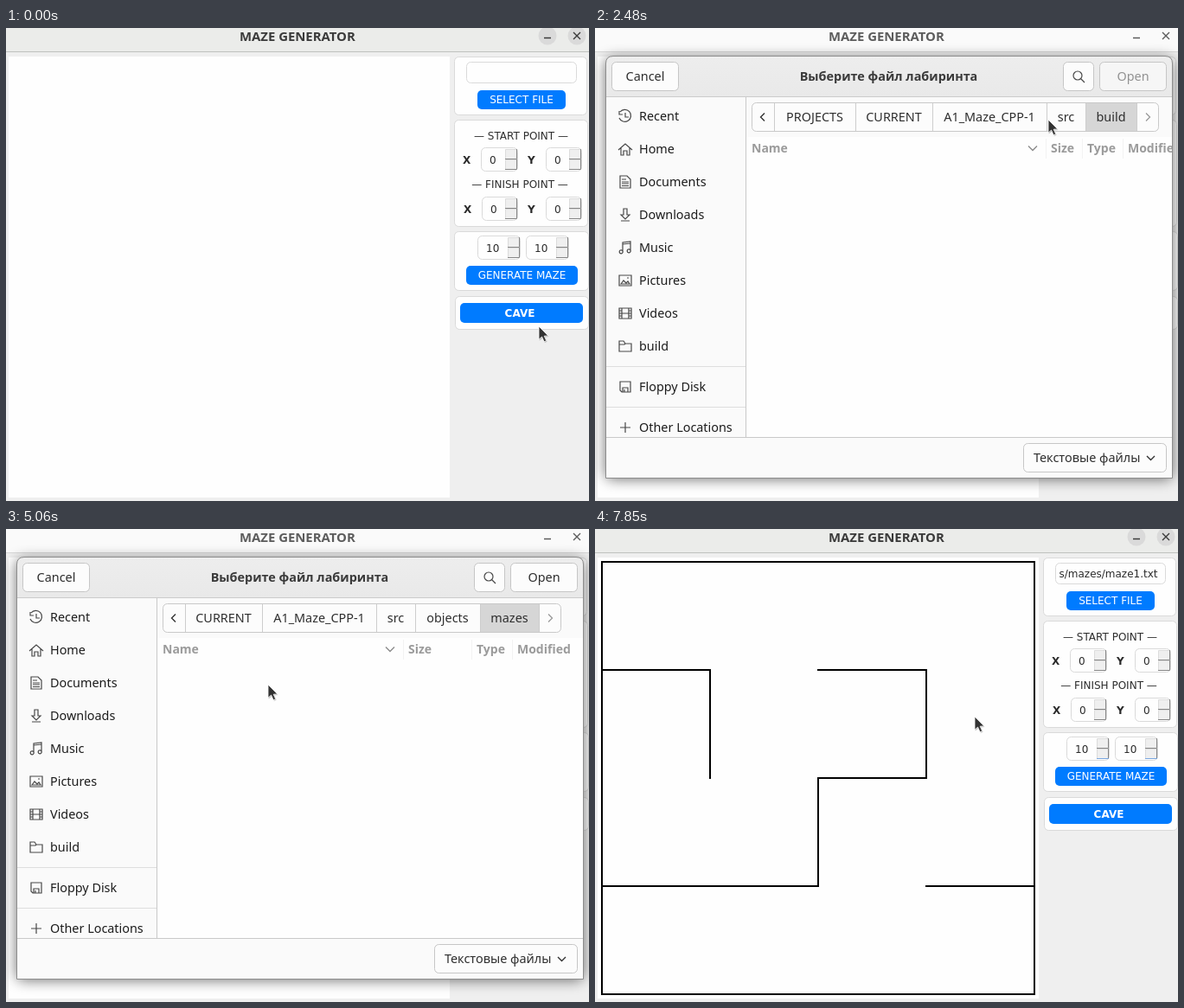
Write an HTML page that moves like this. It is 674 px wide and 547 px high and loops after 7.92 s.

```html
<!DOCTYPE html>
<html lang="en">
<head>
<meta charset="utf-8">
<title>Maze generator</title>
<style>
  html, body { margin: 0; width: 100%; height: 100%; overflow: hidden; background: #efefef; }
  svg { display: block; width: 674px; height: 547px; }
  text { white-space: pre; }
  .app { font: 12px "DejaVu Sans", sans-serif; fill: #2b2b2b; }
  .gtk { font: 14.4px "Noto Sans", "Open Sans", sans-serif; fill: #2e2e2e; }
  .bold { font-weight: bold; }
  .icon { fill: none; stroke: #484848; stroke-width: 1.2; }
</style>
</head>
<body>
<svg viewBox="0 0 674 547">
  <defs>
    <filter id="shadow" x="-10%" y="-10%" width="120%" height="120%">
      <feGaussianBlur stdDeviation="8"/>
    </filter>
    <clipPath id="field"><rect x="537" y="40" width="118" height="24"/></clipPath>
    <clipPath id="list"><rect x="175" y="80" width="492" height="393"/></clipPath>
    <clipPath id="frame"><path d="M13 520V41Q13 33 21 33H659Q667 33 667 41V520Z"/></clipPath>
    <linearGradient id="head" x2="0" y2="1">
      <stop offset="0" stop-color="#ededed"/><stop offset="1" stop-color="#e9e9e9"/>
    </linearGradient>
  </defs>
  <g id="scene"></g>
  <g id="cursor">
    <path d="M.7 1V16.6L4.4 13.4L6.9 19L9.6 17.8L7.1 12.4L11.6 12Z" fill="#000" opacity=".22"/>
    <path d="M0 0V15.2L3.6 12.1L6.1 17.8L8.7 16.6L6.2 11.2L10.8 10.9Z" fill="#333" stroke="#fff" stroke-width=".8"/>
  </g>
</svg>
<script>
const LOOP = 7920;
const scene = document.getElementById('scene');
const cursor = document.getElementById('cursor');

// Cursor moves: start, end, number of steps, way points
const MOVES = [
  [200, 670, 8, [616, 345], [608, 220], [616, 104]],
  [810, 940, 3, [616, 104], [621, 90]],
  [1540, 2280, 12, [621, 90], [641, 56], [518, 106]],
  [2340, 2480, 3, [518, 106], [524, 106]],
  [2540, 2740, 4, [524, 106], [541, 106]],
  [3000, 3070, 2, [541, 106], [470, 119]],
  [3140, 3200, 2, [470, 119], [320, 252]],
  [3800, 4130, 6, [320, 252], [302, 170]],
  [4270, 4270, 1, [302, 170], [304, 168]],
  [4530, 4860, 6, [304, 168], [303, 180]],
  [5390, 5850, 8, [303, 180], [301, 169]],
  [6970, 7110, 3, [301, 169], [303, 172]],
  [7310, 7850, 9, [303, 172], [439, 217]]
];

const rect = (x, y, w, h, fill, extra = '') =>
  `<rect x="${x}" y="${y}" width="${w}" height="${h}" fill="${fill}" ${extra}/>`;
const box = (x, y, w, h, r, fill = '#fefefe', stroke = '#dadada') =>
  rect(x + .5, y + .5, w - 1, h - 1, fill, `rx="${r}" stroke="${stroke}"`);
const text = (cls, x, y, s, extra = '') => `<text class="${cls}" x="${x}" y="${y}" ${extra}>${s}</text>`;
const mid = (cls, x, y, s, fill = '#2e2e2e') =>
  text(cls, x, y, s, `text-anchor="middle" style="fill:${fill}"`);
const line = (d, stroke, width = 1) => `<path d="${d}" fill="none" stroke="${stroke}" stroke-width="${width}"/>`;
const icon = (x, y, d) => `<path class="icon" transform="translate(${x} ${y})" d="${d}"/>`;

function button(x, y, w, label, cls = 'app', fill = '#007bff') {
  return rect(x, y, w, 22, fill, 'rx="5"') + mid(cls, x + w / 2 - (w > 140 ? 2 : 0), y + 15.3, label, '#fff');
}

function spin(x, y, w, value, blue) {
  const bx = x + w - 15;
  const half = top => rect(bx, top, 14, 12, '#efefef') +
    line(`M${bx + .5} ${top + 11}V${top + .5}H${bx + 13}`, '#dcdcdc') +
    line(`M${bx} ${top + 11.5}H${bx + 13.5}V${top}`, '#868686');
  return box(x, y, w, 28, 5) + half(y + 2) + half(y + 14) +
    (blue ? line(`M${bx} ${y + 25.5}H${bx + 14}`, '#7aa7e0') : '') +
    text('app', x + 10, y + 18.5, value);
}

function maze() {
  const at = (c, r) => `${8 + c * 125} ${38 + r * 125}`;
  const run = (...pts) => 'M' + pts.map(p => at(...p)).join('L');
  return line(run([0, 0], [4, 0], [4, 4], [0, 4]) + 'Z' + run([0, 1], [1, 1], [1, 2]) +
    run([2, 1], [3, 1], [3, 2], [2, 2], [2, 3], [0, 3]) + run([3, 3], [4, 3]), '#000', 2)
    .replace('/>', ' stroke-linecap="square"/>');
}

function mainWindow(s) {
  const ink = s.focus ? '#3a3a3a' : '#5c5c5c';
  let out = rect(0, 0, 674, 547, '#efefef') + rect(0, 0, 674, 27, s.focus ? '#ebecea' : '#fafafa') +
    rect(0, 27, 674, 1, s.focus ? '#bfc1be' : '#d8d8d8') +
    text('gtk bold', 270, 15, 'MAZE GENERATOR', `style="font-size:14.9px;fill:${ink}"`);
  if (s.focus) out += [626, 660].map(x => `<circle cx="${x}" cy="9" r="10.5" fill="#dadada"/>`).join('');
  out += line('M622 11.5H630M656 5L664 13M664 5L656 13', ink, 1.4);
  out += rect(3, 33, 510, 510, '#fefefe') + (s.loaded ? maze() : '');
  out += box(518, 33, 154, 68, 5) + box(518, 106, 155, 124, 5) +
    box(518, 235, 156, 69, 5) + box(519, 310, 155, 39, 5);
  out += box(532, 39, 128, 25, 5);
  if (s.loaded) out += `<g clip-path="url(#field)">${text('app', 650.5, 56, 's/mazes/maze1.txt', 'text-anchor="end"')}</g>`;
  out += button(545, 72, 102, 'SELECT FILE', 'app', s.pressed ? '#0056b3' : '#007bff');
  out += mid('app', 595.5, 129, '— START POINT —') + mid('app', 594, 185, '— FINISH POINT —');
  out += text('app bold', 528, 157, 'X') + text('app bold', 603, 157, 'Y') +
    text('app bold', 529, 214, 'X') + text('app bold', 603, 214, 'Y');
  out += spin(549, 138, 43, 0) + spin(624, 138, 42, 0) + spin(550, 195, 42, 0) + spin(624, 195, 42, 0);
  out += spin(545, 240, 50, 10, s.closed) + spin(601, 240, 50, 10, s.closed);
  return out + button(532, 275, 129, 'GENERATE MAZE') + rect(525, 318, 142, 23, '#007bff', 'rx="5"') +
    mid('app bold', 594, 334, 'CAVE', '#fff');
}

const PLACES = [
  ['Recent', 102, 'M2 -5A7 7 0 1 1 1 2M1 -6V-2H5M8 -4V1H12'],
  ['Home', 140, 'M0 1L8 -6L16 1M3 -1V7H6V2H10V7H13V-1'],
  ['Documents', 178, 'M2 -7H10L14 -3V7H2ZM4 -3H9M4 0H12M4 2H12M4 4.5H12'],
  ['Downloads', 216, 'M6 -7H10V0H13L8 5L3 0H6ZM3 7H13'],
  ['Music', 254, 'M5 4V-6L14 -7V3M5 -4L14 -5M5 4A2 2 0 1 1 4 3ZM14 3A2 2 0 1 1 13 2Z'],
  ['Pictures', 292, 'M1 -6H15V6H1ZM3 4L6 0L9 3L11 1L13 4ZM10 -3H12'],
  ['Videos', 330, 'M1 -6H15V6H1ZM4 -6V6M12 -6V6M4 0H12M1 -3H4M1 0H4M1 3H4M12 -3H15M12 0H15M12 3H15'],
  ['build', 368, 'M1 6V-6H6L8 -3H15V6ZM1 -2H7L8 -3'],
  ['Floppy Disk', 415, 'M2 -6H14V6H4L2 4ZM5 6V1H11V6M7 3V6'],
  ['Other Locations', 462, 'M8 -6V6M2 0H14']
];

// Folder views: path labels, cell edges, active cell, header columns, rows
const FIRST = ['PROJECTS', 'CURRENT', 'A1_Maze_CPP-1', 'src', 'build'];
const FIRST_EDGES = [181, 207, 301, 390, 522, 567, 626, 652];
const WIDE = [481, 502, 544, 591];
const file = (name, size) => [name, '6 апр', size];
const VIEWS = {
  build: { path: FIRST, edges: FIRST_EDGES, on: 4, cols: [506, 527, 569, 616], rows: [] },
  src: {
    path: FIRST, edges: FIRST_EDGES, on: 3, cols: WIDE,
    rows: [['build', '12:51'], ['controller', 'Чт'], ['misc', '11:50'], ['model', 'Yesterday'],
      ['objects', 'Чт'], ['tests', 'Yesterday'], ['view', '12:51']]
  },
  objects: {
    path: [...FIRST.slice(1, 4), 'objects'], edges: [181, 207, 296, 428, 473, 548, 574], on: 3,
    cols: WIDE, rows: [['caves', 'Чт'], ['mazes', 'Чт']]
  },
  mazes: {
    path: [...FIRST.slice(1, 4), 'objects', 'mazes'], edges: [181, 207, 296, 428, 473, 548, 616, 642], on: 4,
    cols: [444, 465, 544, 591],
    rows: [file('maze1.txt', '68 bytes'), file('maze2.txt', '406 bytes'), file('maze3.txt', '406 bytes'), file('maze4.txt', '1,6 kB')]
  }
};

function pathBar({ path, edges, on }) {
  const last = edges.length - 1;
  let out = box(181, 86, edges[last] - 181, 34, 5, '#fcfcfc', '#c9c9c9');
  out += rect(edges[on + 1], 87, edges[on + 2] - edges[on + 1], 32, '#d6d6d6');
  for (let i = 1; i < last; i++) out += rect(edges[i], 87, 1, 32, '#cdcdcd');
  path.forEach((name, i) => out += mid('gtk', (edges[i + 1] + edges[i + 2]) / 2, 108, name));
  const end = edges[last] - 15;
  return out + line('M196 98.5L191.500 103L196 107.5', '#333', 1.4) +
    line(`M${end} 98.5L${end + 4.5} 103L${end} 107.5`, '#999', 1.3);
}

function fileRow([name, date, size], i, selected) {
  const y = 152 + 23.3 * i;
  const style = `style="fill:${selected ? '#fff' : '#1c1c1c'}"`;
  const cell = (x, s) => text('gtk', x, y + 16.8, s, style);
  let out = selected ? rect(175, y, 492, 23.6, '#e95420') : '';
  out += size
    ? `<g transform="translate(184 ${y + 4})">` +
      '<path d="M.5 .5H9.500L13.500 4.500V14.500H.5Z" fill="#fafafa" stroke="#a8a8a8"/>' +
      line('M3 4.5H8M3 7H11M3 9.500H11M3 12H9', '#999') + '</g>' + cell(467, size) + cell(546, 'Text')
    : `<g transform="translate(183 ${y + 4})">` +
      '<path d="M0 2Q0 0 2 0H6L8 2H14Q16 2 16 4V13Q16 15 14 15H2Q0 15 0 13Z" fill="#5a4441"/>' +
      rect(.7, 4, 14.6, 10.2, '#707070', 'rx="1"') + '</g>';
  return out + cell(207, name) + cell(593, date);
}

function dialog(s) {
  const view = VIEWS[s.view];
  const head = (x, label) => text('gtk bold', x, 144, label, 'style="font-size:14px;fill:#9b9b9b"');
  const [arrow, ...cols] = view.cols;
  let out = rect(12, 35, 656, 487, '#000', 'rx="8" opacity=".55" filter="url(#shadow)"');
  out += '<g clip-path="url(#frame)">' + rect(13, 33, 654, 487, '#fafafa') +
    rect(13, 33, 654, 46, 'url(#head)') + rect(175, 126, 492, 347, '#fefefe') + '</g>';
  out += rect(13, 79, 654, 1, '#cbcbcb') + rect(174, 80, 1, 393, '#c9c9c9') + rect(13, 473, 654, 1, '#c9c9c9') +
    rect(13, 391, 161, 1, '#dedede') + rect(13, 438, 161, 1, '#dedede');
  out += line('M12.5 520.5V41Q12.5 32.5 21 32.5H659Q667.5 32.5 667.5 41V520.5Z', '#8d8d8d');
  out += box(19, 39, 78, 34, 5, '#fcfcfc', '#c6c6c6') + mid('gtk', 58, 61, 'Cancel') +
    mid('gtk bold', 339.5, 61, 'Выберите файл лабиринта', '#3a3a3a') +
    box(541, 39, 36, 34, 5, '#fcfcfc', '#c6c6c6') +
    icon(551, 48, 'M12 7A5 5 0 1 1 2 7A5 5 0 1 1 12 7ZM10.500 10.500L15 15');
  const empty = !view.rows.length;
  out += box(583, 39, 78, 34, 5, s.opening ? '#d6d6d6' : empty ? '#f6f6f6' : '#fcfcfc', '#c6c6c6') +
    mid('gtk', 622, 61, 'Open', empty ? '#929292' : '#2e2e2e');
  for (const [name, y, d] of PLACES) out += icon(27, y, d) + text('gtk', 51, y + 5, name, 'style="fill:#1c1c1c"');
  out += '<g clip-path="url(#list)">' + pathBar(view) + head(181, 'Name') +
    line(`M${arrow - 5} 136.5L${arrow} 141.500L${arrow + 5} 136.5`, '#8a8a8a', 1.3);
  ['Size', 'Type', 'Modified'].forEach((name, i) =>
    out += head(cols[i], name) + rect(cols[i] - 6, 128, 1, 23, '#f3f3f3'));
  if (s.rows) view.rows.forEach((row, i) => out += fileRow(row, i, i === s.selected));
  out += '</g>' + box(495, 480, 166, 34, 5, '#fcfcfc', '#c6c6c6') + text('gtk', 507, 502, 'Текстовые файлы') +
    line('M638 495L642.500 499.500L647 495', '#333', 1.4);
  return out;
}

function stateAt(t) {
  return {
    focus: t < 1210 || t >= 6440,
    pressed: t >= 940 && t < 1140,
    open: t >= 1210 && t < 6380,
    closed: t >= 6380,
    loaded: t >= 6310,
    opening: t >= 6110,
    view: t < 2940 ? 'build' : t < 3540 ? 'src' : t < 5060 ? 'objects' : 'mazes',
    rows: !(t >= 3540 && t < 3600 || t >= 5060 && t < 5130),
    selected: t >= 3400 && t < 3540 ? 4 : t >= 4860 && t < 5060 ? 1 : 0
  };
}

function cursorAt(t) {
  let pos = MOVES[0][3];
  for (const [start, end, steps, ...pts] of MOVES) {
    if (t < start) break;
    const gap = (end - start) / (steps - 1 || 1) || 1;
    const p = Math.min(1, (Math.floor((t - start) / gap + 1e-6) + 1) / steps);
    const along = p * p * (3 - 2 * p) * (pts.length - 1);
    const i = Math.min(pts.length - 2, Math.floor(along));
    pos = pts[i].map((v, k) => v + (pts[i + 1][k] - v) * (along - i));
  }
  return pos.map(Math.round);
}

let shown = '';
function render(t) {
  const state = stateAt(t);
  const key = JSON.stringify(state);
  if (key !== shown) {
    scene.innerHTML = mainWindow(state) + (state.open ? dialog(state) : '');
    shown = key;
  }
  cursor.setAttribute('transform', `translate(${cursorAt(t).join(' ')})`);
}

const began = performance.now();
function tick() {
  render((performance.now() - began) % LOOP);
  requestAnimationFrame(tick);
}
tick();
</script>
</body>
</html>
```
